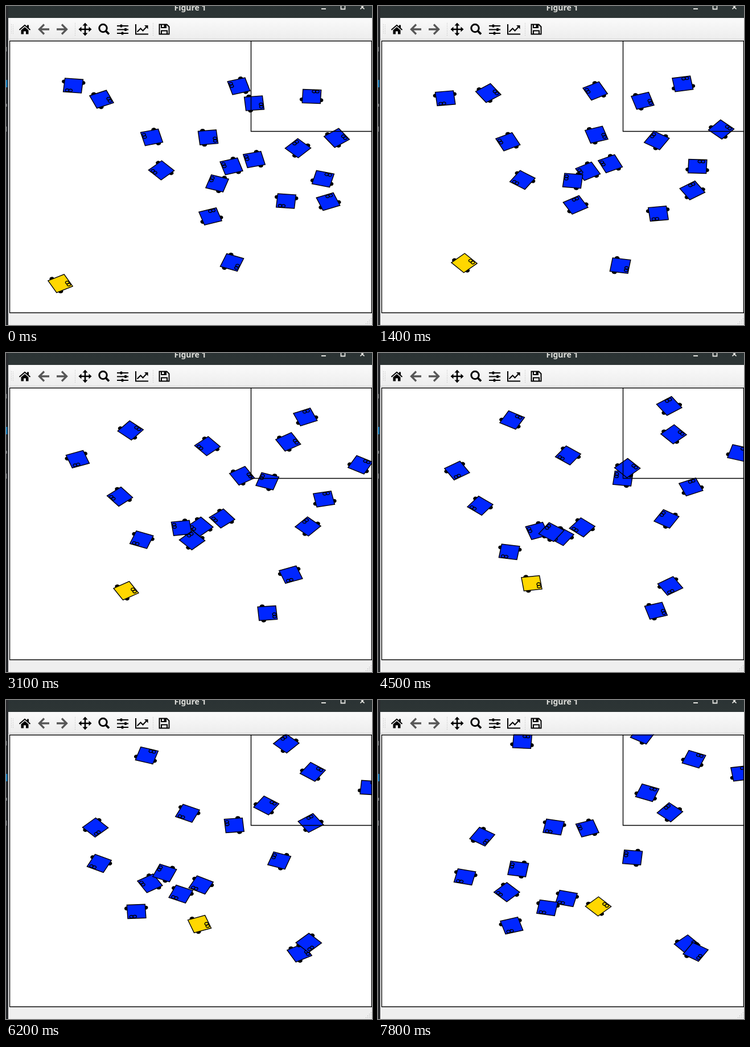
Animation of 643 by 561 pixels, one loop 8000 ms. Source, as an HTML page:

```html
<!DOCTYPE html>
<html lang="en">
<head>
<meta charset="utf-8">
<title>Figure 1</title>
<style>
  html, body { margin: 0; width: 100%; height: 100%; overflow: hidden; background: #fff; }
  svg { display: block; }
  #bot * { vector-effect: non-scaling-stroke; stroke: #000; stroke-width: 1.4; }
  .line { fill: none; stroke: #000; }
  .title { font: 700 14px "Noto Sans", "Open Sans", sans-serif; fill: #dfdfdb; text-anchor: middle; }
</style>
</head>
<body>
<svg width="643" height="561" viewBox="0 0 643 561">
  <defs>
    <linearGradient id="head" x2="0" y2="1"><stop stop-color="#2b3334"/><stop offset="1" stop-color="#2d3535"/></linearGradient>
    <linearGradient id="bar" x2="0" y2="1"><stop stop-color="#fafafa"/><stop offset="1" stop-color="#ededed"/></linearGradient>
    <clipPath id="axes"><path d="M6 60.5H643V540H6z"/></clipPath>
    <!-- facing +x; the plot squeezes y to 3/4 -->
    <g id="bot">
      <circle cx="-8" cy="-16.5" r="3.6" fill="#000"/>
      <circle cx="-8" cy="16.5" r="3.6" fill="#000"/>
      <path d="M-16-16H16V16H-16z"/>
      <circle cx="11.8" cy="3.6" r="3.2" fill="none"/>
      <circle cx="11.8" cy="9.4" r="3.2" fill="none"/>
    </g>
  </defs>

  <!-- window frame -->
  <path fill="#fff" d="M0 0H643V561H0z"/>
  <path fill="url(#head)" d="M0 0H643V21H0z"/>
  <path fill="url(#bar)" d="M4 21H643V58H4z"/>
  <path fill="#c9c9c9" d="M4 58H643V59H4z"/>
  <path fill="#efefef" d="M4 541H643V561H4z"/>
  <path fill="#292b2e" d="M0 0H4V561H0z"/>
  <path fill="#1a7fbd" d="M0 130H2.5V143H0z"/>
  <path fill="#77797b" d="M0 72H1.5V80H0zM0 172H2V177H0zM0 212H1.5V221H0z"/>
  <text class="title" x="323.500" y="8">Figure 1</text>
  <g fill="none" stroke="#e2e2de" stroke-width="1.8">
    <path d="M554 5H562M588.500-2V5.500H595.500V-2M622.500-2L629.500 5.500M629.500-2L622.500 5.500"/>
  </g>
  <path class="line" style="stroke:#bbb" stroke-dasharray="1 2" d="M9.500 32V50M12.500 33V50M121.500 30V52M258.500 30V52"/>
  <path class="line" style="stroke:#aaa" stroke-dasharray="1 2" d="M632 558.500H642M635 555.500H642M638 552.500H642M641 549.500H642"/>

  <!-- toolbar -->
  <path d="M26.500 42.500L33 37L39.500 42.500V49.500H35V44.500H31V49.500H26.500zM37 33.500H40V39H37z"/>
  <path class="line" stroke-width="2" d="M23.500 42L33 33.800L42.500 42"/>
  <path class="line" style="stroke:#575757" stroke-width="3.300" d="M76 41H59M67 32.500L58.500 41L67 49.500M89 41H106M98 32.500L106.500 41L98 49.500"/>
  <path class="line" stroke-width="2.600" d="M139 33V49M131 41H147"/>
  <path d="M139 29.500L143.500 34.500H134.500zM139 52.500L143.500 47.500H134.500zM127.500 41L132.500 36.500V45.500zM150.500 41L145.500 36.500V45.500z"/>
  <circle class="line" cx="170.500" cy="39" r="6.700" stroke-width="3"/>
  <path class="line" stroke-width="3.800" d="M175 43.500L181 49.500"/>
  <path class="line" stroke-width="1.900" d="M195 35H215M195 41.500H215M195 48H215"/>
  <path class="line" stroke-width="3.500" d="M202.500 32.500V37.500M210 39V44M204.500 45.500V50.500"/>
  <path class="line" stroke-width="2" d="M228 32V49.500H250M230.500 45.500L236.500 39.500L240.500 43.500L247 36.500"/>
  <path d="M243 34H249.500V40.500z"/>
  <path class="line" stroke-width="2" d="M269.500 32.500H282.500L286.500 36.500V49.500H269.500zM273 49V43.500H283V49M273 33V38H281V33"/>
  <path d="M277.500 33H280.500V37H277.500z"/>

  <g id="bots" clip-path="url(#axes)"></g>
  <path class="line" stroke-width="1.400" d="M6.500 61.500H642.500V539.500H6.500zM430.500 61.500V220.500H642.500"/>
</svg>
<script>
const LOOP = 8000, SPEED = 4.23, TURN = 1.7, SQUEEZE = 0.75, RAD = Math.PI / 180;

// moments at which the simulation advances one step
const ticks = [300, 400, 700, 900, 1000, 1200, 1400, 1600, 1800, 2100, 2200, 2400, 2600,
  2900, 3100, 3300, 3500, 3700, 3900, 4100, 4300, 4500, 4700, 4900, 5100,
  5400, 5600, 5800, 6200, 6300, 6500, 6700, 6900, 7100, 7400, 7600, 7800];

// blue robots: start x, y, heading
const starts = [[118, 140, 95.5], [168, 164, -23.5], [256, 231, 165.5], [273, 289, 136.3],
  [409, 141, 163.9], [436, 171, -5.4], [537, 159, -87.4], [581, 232, -36], [513, 250, -136],
  [355, 231, -6], [436, 270, 166.4], [396, 282, 163], [371, 312, 198], [359, 370, -107.8],
  [397, 451, 20.6], [492, 343, 95.1], [557, 304, -75.8], [566, 344, -111.6]];

// steered robot: step, x, y, heading
const route = [[0, 95.5, 488, -28], [7, 151.5, 452, -43], [10, 175, 436.5, -38], [15, 211, 418, -31],
  [22, 270, 405, -8], [29, 340, 394, -20], [37, 387, 363, -44]];

const layer = document.getElementById("bots");
function addBot(fill) {
  const bot = document.createElementNS("http://www.w3.org/2000/svg", "use");
  bot.setAttribute("href", "#bot");
  bot.setAttribute("fill", fill);
  return layer.appendChild(bot);
}
const blues = starts.map(() => addBot("#0026ff"));
const gold = addBot("#ffd700");

function place(bot, [x, y, heading]) {
  bot.setAttribute("transform", `translate(${x} ${y}) scale(1 ${SQUEEZE}) rotate(${heading})`);
}

// constant speed and turn rate: a circular arc
function arc([x, y, heading], step) {
  const half = step * TURN / 2;
  const chord = 2 * SPEED / (TURN * RAD) * Math.sin(half * RAD);
  const dir = (heading - half) * RAD;
  return [x + chord * Math.cos(dir), y + chord * Math.sin(dir) * SQUEEZE, heading - 2 * half];
}

// Hermite curve whose tangents follow the heading
function steer(step) {
  const i = Math.max(1, route.findIndex(key => key[0] >= step));
  const [n0, x0, y0, h0] = route[i - 1], [n1, x1, y1, h1] = route[i];
  const u = (step - n0) / (n1 - n0), v = 1 - u;
  const size = Math.hypot(x1 - x0, (y1 - y0) / SQUEEZE);
  const mix = (p, q, s, e) => v * v * (1 + 2 * u) * p + u * u * (1 + 2 * v) * q + size * u * v * (v * s - u * e);
  return [
    mix(x0, x1, Math.cos(h0 * RAD), Math.cos(h1 * RAD)),
    mix(y0, y1, Math.sin(h0 * RAD) * SQUEEZE, Math.sin(h1 * RAD) * SQUEEZE),
    h0 + (h1 - h0) * u
  ];
}

function draw() {
  const time = performance.now() % LOOP;
  const step = ticks.filter(tick => tick <= time).length;
  blues.forEach((bot, i) => place(bot, arc(starts[i], step)));
  place(gold, steer(step));
  requestAnimationFrame(draw);
}
draw();
</script>
</body>
</html>
```
